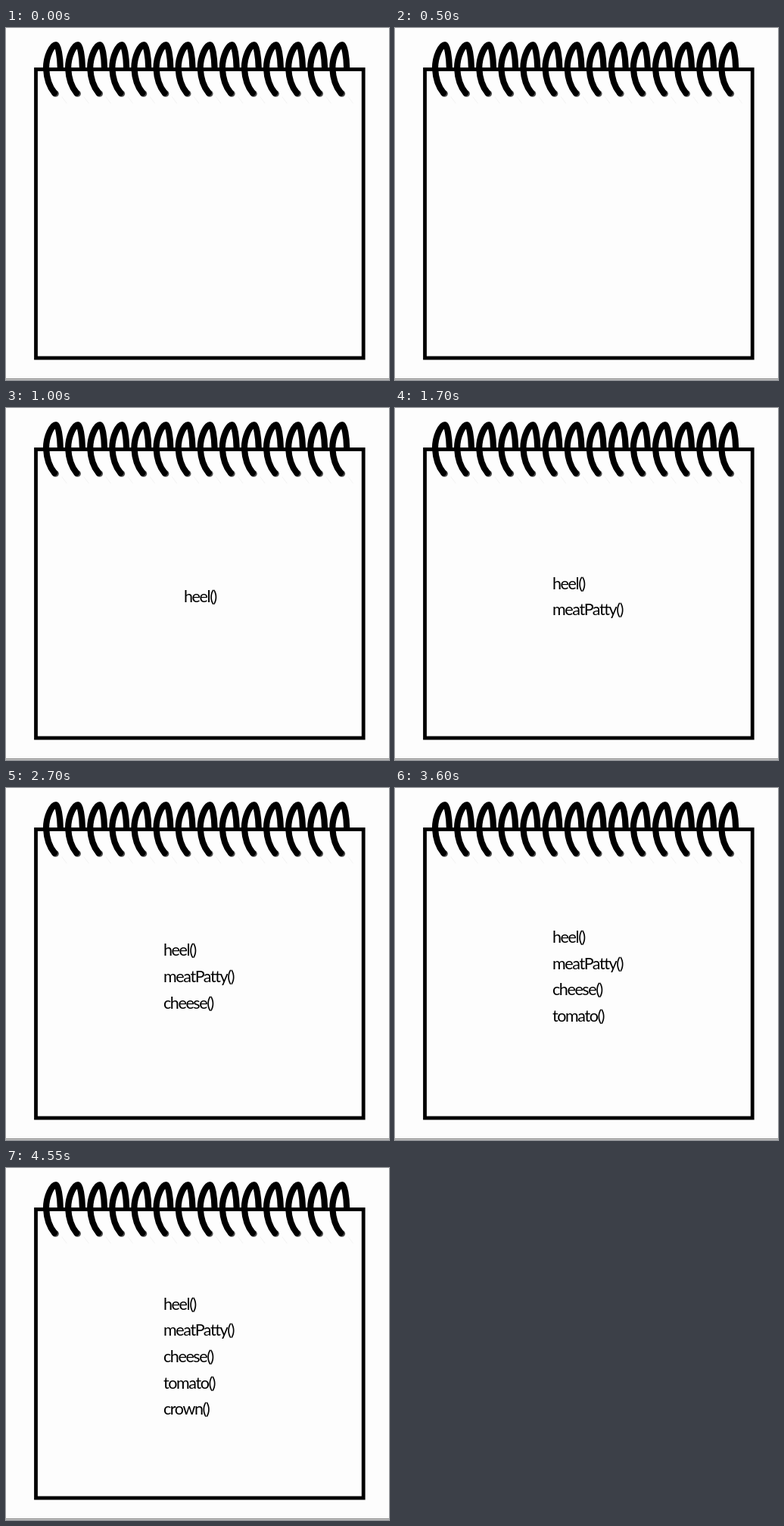
Write an HTML page that moves like this. It is 506 px wide and 464 px high and loops after 5.2 s.

```html
<!DOCTYPE html>
<html lang="en">
<head>
<meta charset="utf-8">
<title>Notepad list</title>
<style>
  html, body { margin: 0; width: 100%; height: 100%; overflow: hidden; background: #fdfdfd; }
  svg { display: block; width: 506px; height: 464px; }
  text { font: 400 21.5px Lato, "Open Sans", sans-serif; letter-spacing: -1.4px; fill: #000; }
  #pad { filter: blur(.6px); }
</style>
</head>
<body>
<svg viewBox="0 0 506 464">
  <defs>
    <g id="ring" fill="none" stroke-linecap="round" stroke-linejoin="round">
      <path d="M9 91L15 99" stroke="#f4f4f4" stroke-width="1.2"/>
      <path d="M0 86.5h.6" stroke="#505050" stroke-width="8.5"/>
      <path d="M6.8 51.5C6.5 38 4 22 1 22C-4 22-12 37-12 53C-11.3 67-6.5 79-1 85.5" stroke="#000" stroke-width="8.2"/>
    </g>
  </defs>
  <rect width="506" height="464" fill="#fdfdfd"/>
  <rect y="462" width="506" height="1.3" fill="#777"/>
  <g id="pad">
    <rect x="39.5" y="54.5" width="432.7" height="380.5" fill="none" stroke="#000" stroke-width="4.8"/>
    <g id="rings"></g>
  </g>
  <g id="list"></g>
</svg>
<script>
const LOOP = 5200;
const LINE_HEIGHT = 34.6;
const CENTER_BASELINE = 256;
const items = [
  { label: "heel()", at: 650 },
  { label: "meatPatty()", at: 1700 },
  { label: "cheese()", at: 2700 },
  { label: "tomato()", at: 3600 },
  { label: "crown()", at: 4550 }
];

function add(parent, tag, attributes) {
  const node = document.createElementNS("http://www.w3.org/2000/svg", tag);
  for (const [key, value] of Object.entries(attributes)) node.setAttribute(key, value);
  return parent.appendChild(node);
}

const rings = document.getElementById("rings");
for (let i = 0; i < 14; i++) add(rings, "use", { href: "#ring", x: 65 + i * 29.1 });

const list = document.getElementById("list");
for (const item of items) {
  item.node = add(list, "text", {});
  item.node.textContent = item.label;
}

function render(time) {
  const count = items.filter(item => time >= item.at).length;
  const left = count > 1 ? 208 : 235;
  const top = CENTER_BASELINE - (count - 1) * LINE_HEIGHT / 2;
  items.forEach(({ node }, i) => {
    node.setAttribute("visibility", i < count ? "visible" : "hidden");
    node.setAttribute("x", left);
    node.setAttribute("y", top + i * LINE_HEIGHT);
  });
  // The first entry appears in two quick steps.
  list.setAttribute("opacity", time < 700 ? 0.5 : 1);
}

const start = performance.now();
function tick() {
  render((performance.now() - start) % LOOP);
  requestAnimationFrame(tick);
}
tick();
</script>
</body>
</html>
```
